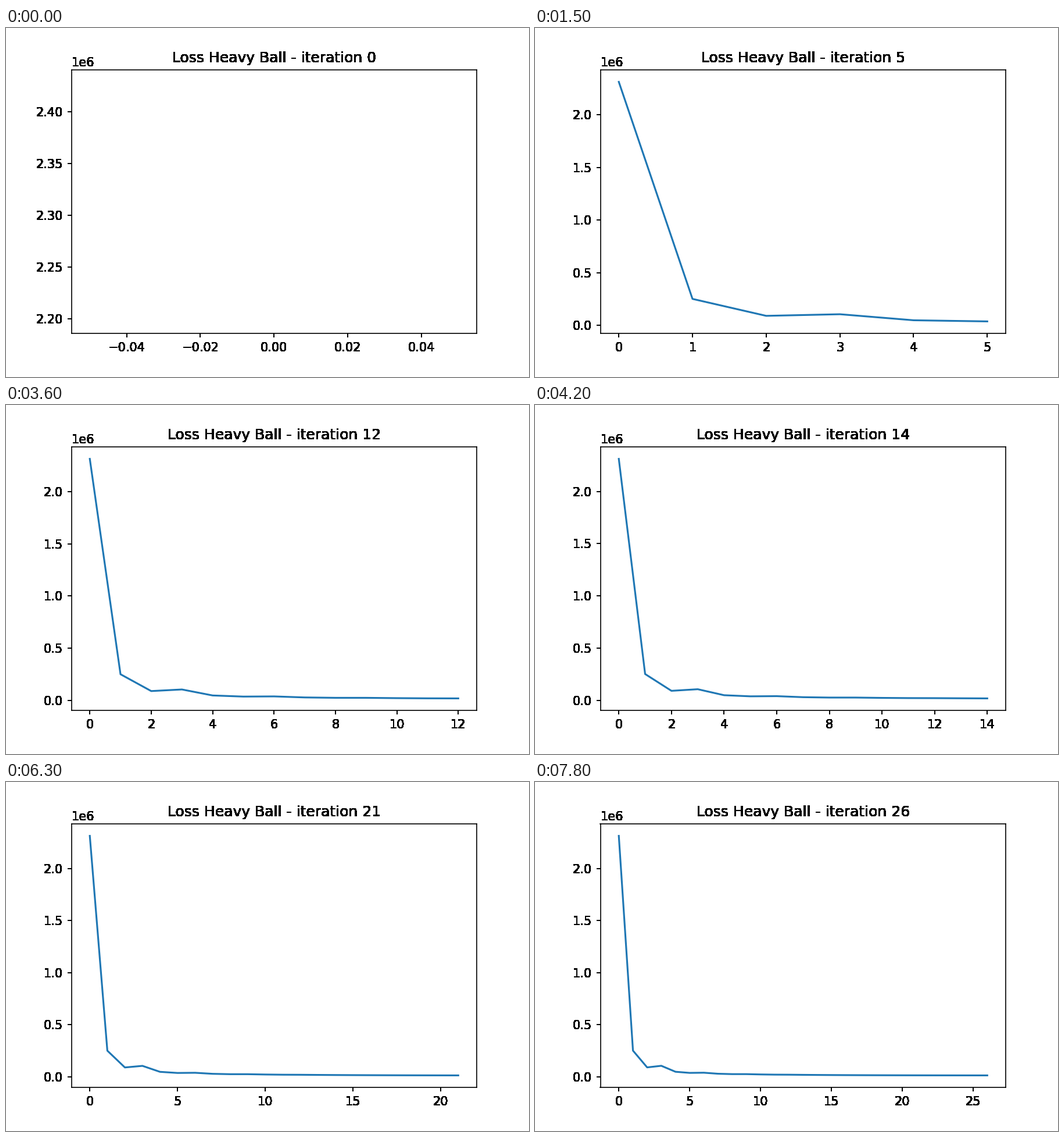
A matplotlib script that plays this animation: 900 by 600 pixels, repeating every 8000 ms.

```python
import numpy as np
import matplotlib.pyplot as plt
from matplotlib.animation import FuncAnimation

STEP_MS, TICK_MS, LOOP_MS = 300, 100, 8000

# Heavy-ball losses: a bumpy start, then an exponential tail.
start = np.array([2313.3, 251, 90, 105.3, 48, 37.2, 38.9, 29, 25.4, 25.3, 22.3, 20.4])
tail = 12.7 + 7.1 * 0.81 ** np.arange(15)
loss = np.concatenate([start, tail]) * 1e3

plt.rcParams["font.family"] = "DejaVu Sans"
fig, ax = plt.subplots(figsize=(6, 4), dpi=150, facecolor="white")
fig.subplots_adjust(left=0.125, right=0.9, bottom=0.125, top=0.88)


def hard_edges(image, dpi):
    """Turn every touched pixel solid black, so text has no soft edge."""
    solid = np.zeros_like(image)
    solid[..., 3] = image[..., 3] > 0
    return solid, 0, 0


def draw(tick):
    iteration = tick * TICK_MS // STEP_MS
    ax.clear()
    ax.plot(loss[:iteration + 1], color="C0", linewidth=1.5)
    title = ax.set_title(f"Loss Heavy Ball - iteration {iteration}")
    for artist in (title, ax.xaxis, ax.yaxis):
        artist.set_agg_filter(hard_edges)


anim = FuncAnimation(fig, draw, frames=LOOP_MS // TICK_MS, interval=TICK_MS,
                     init_func=lambda: None, repeat=True, repeat_delay=0)
plt.show()
```
